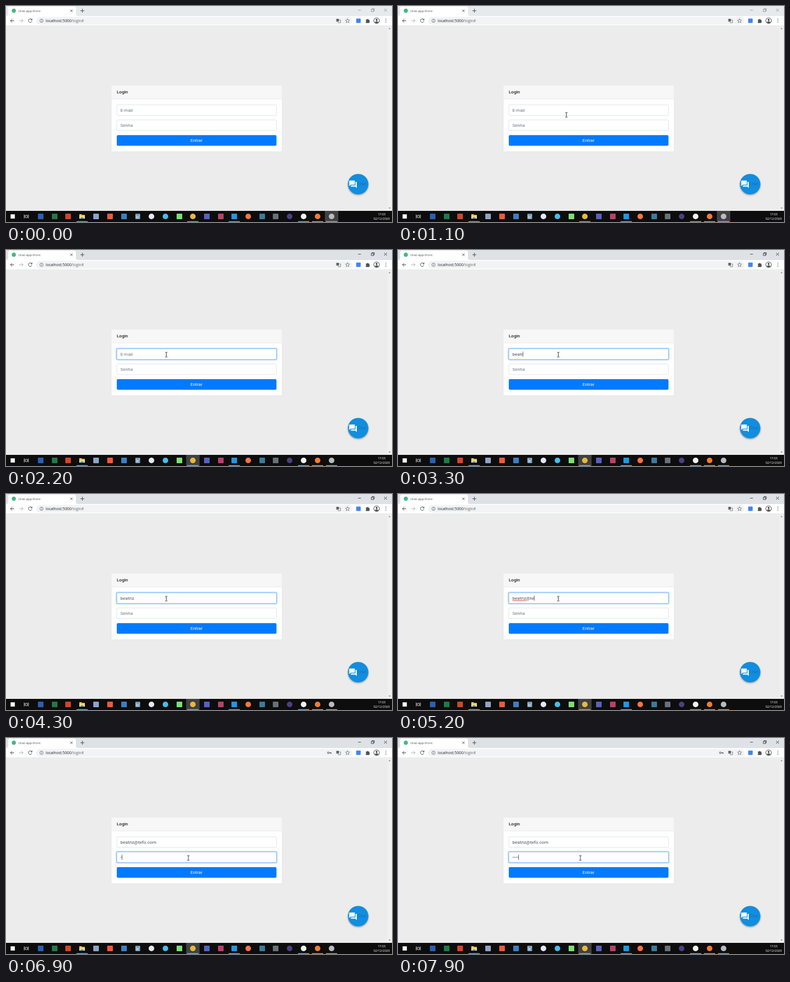
An HTML page for the animation above (8 s loop, 690x388 px).

```html
<!DOCTYPE html>
<html lang="pt">
<head>
<meta charset="utf-8">
<title>Login</title>
<style>
html, body { margin: 0; width: 100%; height: 100%; overflow: hidden; }
svg { display: block; width: 690px; height: 388px; }
text { white-space: pre; }
.page { font: 8.08px Roboto, sans-serif; fill: #495057; }
.ui { font-family: "Open Sans", sans-serif; }
.line { fill: none; stroke: #4d5156; stroke-width: 1; }
.hint { fill: #6c757d; }
.field { fill: #fff; stroke: #ced4da; stroke-width: .6; }
.ring { fill: none; stroke: #007bff; stroke-opacity: .28; stroke-width: 1.8; }
.edge { fill: none; stroke: #80bdff; stroke-width: .8; }
</style>
</head>
<body>
<svg viewBox="0 0 690 388">
  <defs>
    <filter id="soft" x="-30%" y="-30%" width="160%" height="160%"><feGaussianBlur stdDeviation="1.6"/></filter>
  </defs>
  <rect width="690" height="388" fill="#ececec"/>

  <!-- browser -->
  <rect id="strip" width="690" height="18"/>
  <path d="M0 18Q4 18 4 14V5Q4 1 8 1H121Q125 1 125 5V14Q125 18 129 18H690V35.500H0Z" fill="#fff"/>
  <path d="M0 35.500H690" stroke="#dfe1e4" stroke-width=".7"/>
  <circle cx="14" cy="8.500" r="3.700" fill="#41b883"/>
  <text class="ui" x="22" y="10.800" font-size="5.900" fill="#4b4f54">chat-app-front</text>
  <path class="line" d="M115 6.500l4 4m0-4l-4 4M133 8.500h7m-3.500-3.500v7"/>
  <g id="controls" fill="none" stroke-width=".8">
    <path d="M629.500 7.500h5M676 5l5 5m0-5l-5 5M653 6h4v4h-4zM654.300 6V4.700h4v4H657"/>
  </g>
  <path class="line" d="M14.500 26.500H8m3.200-3.200L8 26.500l3.200 3.200M46 24.500a3.200 3.200 0 1 0 .4 2.800M46.500 22.800v2.400h-2.400"/>
  <path class="line" d="M24 26.500h6.500m-3.200-3.200l3.200 3.200-3.200 3.200" style="stroke:#b4b7ba"/>
  <rect x="54" y="19.500" width="565" height="14" rx="7" fill="#f1f3f4"/>
  <circle class="line" cx="63.500" cy="26.500" r="3" style="stroke-width:.7"/>
  <path class="line" d="M63.500 26v2.200M63.500 24.600v.8" style="stroke-width:.7"/>
  <text class="ui" x="71" y="28.900" font-size="6.800" fill="#202124">localhost:5000<tspan fill="#686c71">/login#</tspan></text>
  <g id="key" class="line"><circle cx="576" cy="26.500" r="1.500"/><path d="M577.500 26.500h4v1.700m-1.500-1.700v1.500"/></g>
  <rect x="590.500" y="23" width="4.500" height="5" fill="#5f6368"/>
  <path class="line" d="M595.500 25h2.500v5h-4v-1.500" style="stroke-width:.7"/>
  <path class="line" d="M610.500 22.700l1.100 2.400 2.600.3-1.900 1.800.5 2.600-2.300-1.300-2.300 1.300.5-2.600-1.900-1.800 2.600-.3z" style="stroke-width:.7"/>
  <rect x="626" y="22.500" width="8" height="8" rx="1" fill="#4285f4"/>
  <path d="M643 24.500h2.200a1.200 1.200 0 0 1 2.400 0h2v2.200a1.200 1.200 0 0 1 0 2.200v1.600h-6.600v-2a1.100 1.100 0 0 0 0-2.200z" fill="#4d5156"/>
  <circle cx="662.500" cy="26.500" r="5" fill="#fff" stroke="#3c4043"/>
  <circle cx="662.500" cy="25" r="1.700" fill="#3c4043"/><path d="M659 29q3.500-3 7 0-3.500 3.400-7 0z" fill="#3c4043"/>
  <path d="M679 23.500h.01m-.01 3h.01m-.01 3h.01" stroke="#4d5156" stroke-width="1.500" stroke-linecap="round"/>
  <rect x="682" y="36" width="8" height="332" fill="#f0f0f0"/>
  <path d="M683.700 41.500l2-2.200 2 2.200zM683.700 362l2 2.200 2-2.200z" fill="#8a8a8a"/>

  <!-- login card -->
  <g class="page">
    <rect x="188.300" y="142.600" width="305.200" height="119" rx="1.500" fill="#fff" stroke="#dedede" stroke-width=".5"/>
    <path d="M188.500 143H493.300V167H188.500z" fill="#f7f7f7"/>
    <path d="M188.500 167H493.300" stroke="#dcdcdc" stroke-width=".6"/>
    <text x="198" y="157.200" fill="#212529" font-weight="500">Login</text>
    <rect class="field" x="198" y="177.500" width="285.500" height="19" rx="2"/>
    <rect class="field" x="198" y="204.700" width="285.500" height="19" rx="2"/>
    <g id="focus">
      <rect class="ring" x="197" y="176.500" width="287.500" height="21" rx="2.800"/>
      <rect class="edge" x="198" y="177.500" width="285.500" height="19" rx="2"/>
    </g>
    <text id="email" x="204.500" y="189.900"/>
    <text id="password" x="204.500" y="217.100"/>
    <path id="spelling" stroke="#e0393e" stroke-width=".9"/>
    <path id="caret" stroke="#222" stroke-width=".7"/>
    <rect x="198" y="232" width="285.500" height="19" rx="2" fill="#007bff"/>
    <text x="340.500" y="244.300" text-anchor="middle" fill="#fff">Entrar</text>
  </g>

  <!-- chat button -->
  <circle cx="629.500" cy="321.500" r="18.300" fill="#000" opacity=".35" filter="url(#soft)"/>
  <circle cx="629.500" cy="320" r="18.300" fill="#128de0"/>
  <path d="M613.500 313.500h10v7.500h-7.500l-2.500 2.500zM624.800 316h2.200v11l-2.600-2.500h-7.900v-2.200h8.300z" fill="#fff"/>
  <text x="629.500" y="322.300" font-family="Roboto, sans-serif" font-size="7" fill="#1b6fae">Chat</text>

  <!-- taskbar -->
  <rect y="368" width="690" height="20" fill="#0d0d0d"/>
  <rect id="active" y="368" width="24" height="20" fill="#414141"/>
  <g id="apps"></g>
  <rect x="8.200" y="374.200" width="7.600" height="7.600" fill="#fff"/>
  <path d="M32.500 374.500v7m1.800-5.500h4v4h-4zm5.700-1.500v7" fill="none" stroke="#ddd" stroke-width=".9"/>
  <path d="M131 374h4l1 1.300h5v6.500h-10z" fill="#f5c64f"/><path d="M131 377.500h10v4.300h-10z" fill="#fbdf8d"/><path d="M133.500 379.500h5v2.300h-5z" fill="#3d9be0"/>
  <path d="M231.500 373.500h8v9h-8z" fill="#d7e5f0"/><path d="M232.500 374.500h6v2h-6zm0 3h1.500v1.500h-1.500zm2.300 0h1.500v1.500h-1.500zm2.300 0h1.500v4h-1.500zm-4.600 2.500h1.500v1.500h-1.500zm2.300 0h1.500v1.500h-1.500z" fill="#3a83b8"/>
  <g class="ui" font-size="5.500" fill="#fff" text-anchor="middle">
    <text x="671.500" y="375.500">17:03</text><text x="671.500" y="384">02/12/2020</text>
  </g>
  <g id="pointer">
    <path id="beam" d="M-2-4.200H-.5L0-3.700.5-4.200H2M0-3.700V3.700M-2 4.200H-.5L0 3.700.5 4.200H2" fill="none" stroke="#222" stroke-width=".9"/>
    <path id="arrow" d="M0 0V8.500L2 6.700 3.300 9.600 4.600 9 3.300 6.200H6z" fill="#fff" stroke="#111" stroke-width=".6"/>
  </g>
</svg>
<script>
const $ = id => document.getElementById(id);
const show = (id, on) => $(id).style.opacity = +on;

// Taskbar marks: centre x, colour, round?
const apps = [
  [62, '#2b5eb4'], [87, '#1f7a48'], [111, '#d24625'], [161, '#8fa4c8'], [186, '#ee5a3c'],
  [211, '#3c7fc6'], [260, '#e6e9f2', 1], [285, '#47bdea', 1], [310, '#7ddf75'], [334, '#e9b93a', 1],
  [359, '#5a60bd'], [384, '#b8416a'], [408, '#2296e3'], [433, '#f47642', 1], [458, '#3c7a9d'],
  [482, '#687078'], [507, '#4a3f83', 1], [532, '#f1f4ee', 1], [557, '#f37a30', 1], [582, '#b9bbc0', 1]
];
$('apps').innerHTML = apps.map(([x, color, round]) =>
  `<rect x="${x - 5}" y="373" width="10" height="10" rx="${round ? 5 : 1}" fill="${color}"/>`).join('') +
  [136, 334, 408, 532, 557, 582].map(x =>
    `<path d="M${x - 10} 387.300h20" stroke="#76b9ed" stroke-width="1.300"/>`).join('');

const ADDRESS = 'beatriz@tefo.com', NAME_LENGTH = 7;
const emailKeys = [2800, 2900, 3000, 3200, 3300, 3400, 3600, 4400, 4700, 5000, 5300, 5400, 5500, 5600, 5600, 5700];
const passwordKeys = [6800, 7100, 7400, 7700];
const CLICK = 1500, TAB = 5900, SPELLCHECK = 4400;
const actions = [CLICK, ...emailKeys, TAB, ...passwordKeys];
const path = [[400, 560, 372], [1000, 301, 195.5], [1100, 301, 195.5], [CLICK, 286.5, 188],
  [6300, 286.5, 188], [6600, 326, 215.5], [8000, 326, 215.5]];
const pressed = (keys, t) => keys.filter(k => k <= t).length;

function setField(id, value, placeholder) {
  $(id).textContent = value || placeholder;
  $(id).setAttribute('class', value ? '' : 'hint');
}

function pointerAt(t) {
  const i = Math.max(1, path.findIndex(p => p[0] > t));
  const [t0, x0, y0] = path[i - 1], [t1, x1, y1] = path[i];
  const k = Math.max(0, (t - t0) / (t1 - t0));
  const e = k * k * (3 - 2 * k);
  return [x0 + (x1 - x0) * e, y0 + (y1 - y0) * e];
}

function draw(t) {
  const active = t >= CLICK, second = t >= TAB;
  $('strip').setAttribute('fill', active ? '#dee1e6' : '#e7eaed');
  $('controls').setAttribute('stroke', active ? '#222' : '#888');
  $('active').setAttribute('x', active ? 322 : 570);
  show('key', t >= passwordKeys[0]);

  const email = ADDRESS.slice(0, pressed(emailKeys, t));
  const password = '•'.repeat(pressed(passwordKeys, t));
  setField('email', email, 'E-mail');
  setField('password', password, 'Senha');

  $('focus').style.opacity = active ? Math.min(1, (t - (second ? TAB : CLICK) + 50) / 150) : 0;
  $('focus').setAttribute('transform', `translate(0 ${second ? 27.2 : 0})`);

  const field = $(second ? 'password' : 'email'), value = second ? password : email;
  const x = 204.7 + (value ? field.getComputedTextLength() : 0);
  const last = Math.max(...actions.filter(a => a <= t));
  $('caret').setAttribute('d', `M${x} ${second ? 209.6 : 182.4}v9.300`);
  show('caret', active && (t - last) % 1000 < 500);

  const misspelt = t >= SPELLCHECK && !second;
  if (misspelt) $('spelling').setAttribute('d', `M204.500 191.600h${$('email').getSubStringLength(0, NAME_LENGTH)}`);
  show('spelling', misspelt);

  const [px, py] = pointerAt(t);
  const overText = px > 198 && px < 483 && (py > 177 && py < 197 || py > 204 && py < 224);
  $('pointer').setAttribute('transform', `translate(${px} ${py})`);
  show('pointer', t >= path[0][0]);
  show('beam', overText);
  show('arrow', !overText);
}

const start = performance.now();
function tick() {
  draw(Math.floor((performance.now() - start) % 8000 / 100) * 100);
  requestAnimationFrame(tick);
}
tick();
</script>
</body>
</html>
```
